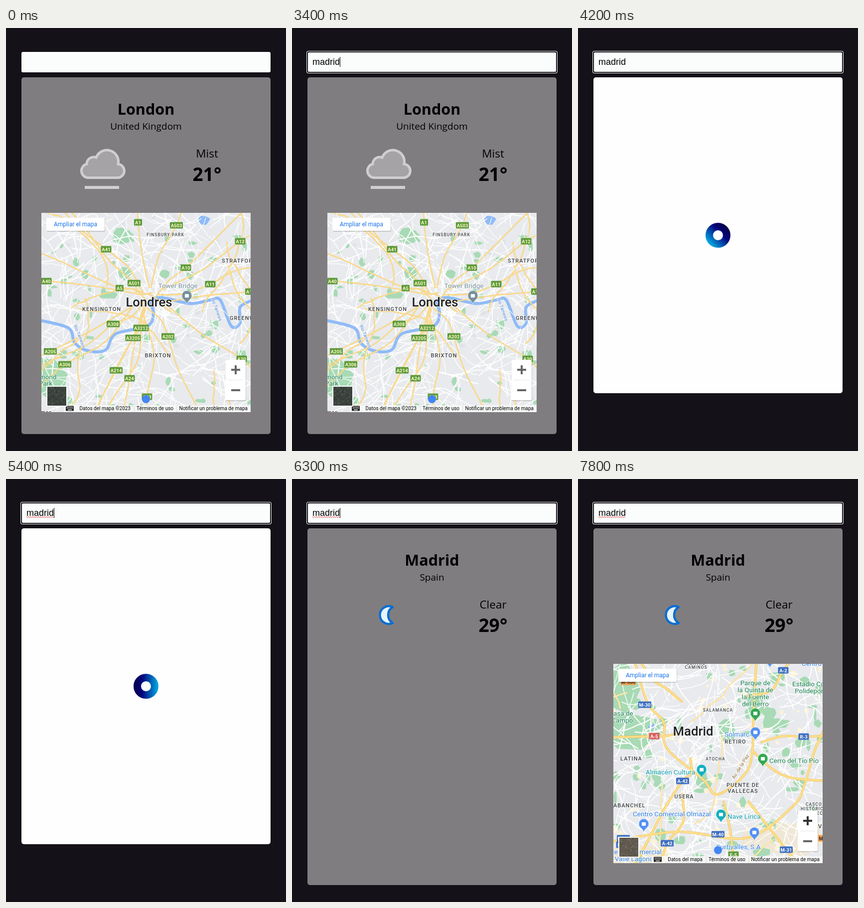
An HTML page for the animation above (8000 ms loop, 562 by 849 pixels).

```html
<!DOCTYPE html>
<html lang="es">
<head>
<meta charset="utf-8">
<style>
  html, body { margin: 0; width: 100%; height: 100%; overflow: hidden; background: #151118; }
  svg { display: block; }
  .card text { font-family: "Open Sans", "Noto Sans", sans-serif; text-anchor: middle; }
  .card .map text { font-family: Roboto, Arial, sans-serif; }
  .map .label { paint-order: stroke; stroke: #fff; stroke-width: 2px; stroke-opacity: .75; stroke-linejoin: round; }
  .line { fill: none; stroke-linecap: round; stroke-linejoin: round; }
  #query { font: 18px "Liberation Sans", Arial, sans-serif; }
  .crisp { shape-rendering: crispEdges; }
</style>
</head>
<body>
<svg id="stage" width="562" height="849" viewBox="0 0 562 849"></svg>
<script>
const LOOP = 8000;
const INK = '#3c4043', GREEN = '#188050', BLUE = '#2f7de1', TEAL = '#129eaf';
const PARK = '#a8dab5', WATER = '#90bbf7', SAND = '#efe7d6';
const SIGN = { blue: '#3f70c2', green: '#5d9a3a', red: '#d9605f', orange: '#f29b4b' };

let seed = 1;
const random = () => (seed = (seed * 16807) % 2147483647) / 2147483647;
const between = (a, b) => a + (b - a) * random();
const clamp = (v, lo, hi) => Math.max(lo, Math.min(hi, v));
const repeat = (n, make) => Array.from({ length: n }, (_, i) => make(i)).join('');

const rect = (x, y, w, h, fill, extra = '') =>
  `<rect x="${x}" y="${y}" width="${w}" height="${h}" fill="${fill}" ${extra}/>`;
const text = (x, y, size, str, extra = '') =>
  `<text x="${x}" y="${y}" font-size="${size}" ${extra}>${str}</text>`;
const label = (x, y, size, str, fill = INK, anchor = 'middle', extra = '') =>
  text(x, y, size, str, `class="label" fill="${fill}" style="text-anchor:${anchor}" ${extra}`);
const place = (x, y, str, fill, anchor) => label(x, y, 13.5, str, fill, anchor);
const district = (x, y, size, str, anchor) =>
  label(x, y, size, str, INK, anchor, 'font-weight="500" letter-spacing="1"');
const cityName = (x, y, str) => label(x, y, 25.7, str, '#202124', 'middle', 'font-weight="500"');
const tilted = (x, y, size, angle, str, fill) =>
  label(x, y, size, str, fill, 'middle', `transform="rotate(${angle} ${x} ${y})"`);
const line = (d, color, width) =>
  `<path class="line" d="${d}" stroke="${color}" stroke-width="${width}"/>`;

// Smooth curve through [x, y] points.
function curve(p) {
  const at = i => p[clamp(i, 0, p.length - 1)];
  let d = `M${p[0]}`;
  for (let i = 0; i < p.length - 1; i++) {
    const [a, b, c, e] = [at(i - 1), at(i), at(i + 1), at(i + 2)];
    const c1 = b.map((v, k) => v + (c[k] - a[k]) / 6);
    const c2 = c.map((v, k) => v - (e[k] - b[k]) / 6);
    d += `C${c1} ${c2} ${c}`;
  }
  return d;
}
const through = points => curve(points.split(' ').map(s => s.split(',').map(Number)));

const roads = (paths, edge, fill, width) =>
  paths.map(d => line(d, edge, width)).join('') + paths.map(d => line(d, fill, width - 1.6)).join('');

// A wobbling road from near the centre, through a sign, out past the map edge.
const radial = (cx, cy, from) => ({ x, y }) => {
  const dx = x - cx, dy = y - cy, size = Math.hypot(dx, dy);
  const point = k => {
    const wobble = k === 1 ? 0 : between(-14, 14);
    return [cx + dx * k - dy / size * wobble, cy + dy * k + dx / size * wobble];
  };
  return curve([from, (1 + from) / 2, 1, 1 + 70 / size, 1 + 180 / size, 1 + 320 / size].map(point));
};

function blob(x, y, rx, ry, fill) {
  const points = Array.from({ length: 9 }, (_, i) => {
    const a = i * Math.PI / 4.5 + between(-.25, .25), r = between(.75, 1.15);
    return `${(x + rx * r * Math.cos(a)).toFixed(1)},${(y + ry * r * Math.sin(a)).toFixed(1)}`;
  });
  return `<polygon points="${points.join(' ')}" fill="${fill}"/>`;
}
const scatter = (n, size, fill) => repeat(n, () =>
  blob(between(71, 491), between(371, 771), between(3, size), between(3, size), fill));

function wander(steps, stride) {
  let x = between(60, 500), y = between(360, 780), a = between(0, 6.3), d = `M${x.toFixed(1)} ${y.toFixed(1)}`;
  for (let i = 0; i < steps; i++) {
    a += between(-.35, .35);
    d += `l${(stride * Math.cos(a)).toFixed(1)} ${(stride * Math.sin(a)).toFixed(1)}`;
  }
  return d;
}
const streets = (n, width) => repeat(n, () => line(wander(7, 12), '#fff', between(width * .5, width).toFixed(1)));
const wanderers = (n, steps) => Array.from({ length: n }, () => wander(steps, 14));

// Signs are written as "name,x,y name,x,y ...".
const signs = list => list.split(' ').map(s => {
  const [name, x, y] = s.split(',');
  return { name, x: +x, y: +y };
});
const badge = (fill, ink = '#fff') => ({ name, x, y }) => {
  const w = name.length * 5 + 6;
  return rect(x - w / 2, y - 6.5, w, 13, fill, 'rx="1.5"') +
    text(x, y + 3.5, 9.5, name, `fill="${ink}" font-weight="700"`);
};
const badges = (list, fill, ink) => list.map(badge(fill, ink)).join('');

const pin = (x, y, fill) =>
  `<path d="M${x} ${y + 17}c-2-8-10-9-10-17a10 10 0 0 1 20 0c0 8-8 9-10 17z" fill="${fill}" stroke="#fff" stroke-width=".6"/>` +
  rect(x - 4, y - 3, 8, 7, '#fff', 'rx="1"');

const map = (id, content) =>
  `<svg id="${id}" class="map" x="71" y="371" width="420" height="400" viewBox="71 371 420 400">` +
  rect(71, 371, 420, 400, '#e8eaed') + content + '</svg>';

function controls(id, [ground, light, dark], keyboardX, credit) {
  const keys = repeat(12, i => rect(keyboardX + 2 + i % 6 * 2.2, 760 + Math.floor(i / 6) * 2.6, 1.2, 1.4, '#fff'));
  const speckle = repeat(60, i => rect(between(83, 117).toFixed(1), between(720, 755).toFixed(1), 3, 2,
    i % 2 ? light : dark, 'opacity=".6"'));
  return `<g id="${id}">` +
    rect(82, 382, 117, 27, '#000', 'rx="2" opacity=".15"') + rect(81, 381, 117, 26, '#fff', 'rx="2"') +
    text(139.5, 398, 12, 'Ampliar el mapa', 'fill="#1a73e8"') +
    rect(441, 667, 41, 82, '#000', 'rx="2" opacity=".15"') + rect(441, 666, 40, 81, '#fff', 'rx="2"') +
    rect(446, 706, 30, 1, '#e6e6e6') +
    `<path id="${id}Plus" class="crisp" d="M452 686h18M461 677v18" stroke="#666" stroke-width="4"/>` +
    '<path class="crisp" d="M452 727h18" stroke="#666" stroke-width="4"/>' +
    '<circle cx="281" cy="745" r="8" fill="#4285f4"/>' +
    rect(keyboardX - 4, 757, 495 - keyboardX, 14, '#f8f8f8', 'opacity=".85"') +
    rect(keyboardX, 758.5, 16, 10, '#222', 'rx="1"') + keys + rect(keyboardX + 4, 765.8, 8, 1.4, '#fff') +
    rect(257, 757, .6, 14, '#ccc') + rect(342, 757, .6, 14, '#ccc') +
    text(250, 767, 10, credit, 'style="text-anchor:end"') +
    text(299, 767, 10, 'Términos de uso') +
    text(485, 767, 10, 'Notificar un problema de mapa', 'style="text-anchor:end"') +
    rect(81, 718, 42, 42, '#fff', 'rx="3"') + rect(83, 720, 38, 38, ground) + speckle + '</g>';
}

function londonMap() {
  seed = 4711;
  const thames = through('65,586 125,602 138,632 165,648 200,646 220,614 284,598 296,572 291,549 312,541 370,553 410,546 430,546 452,598 470,592 470,560 498,545');
  const routes = signs('A1,265,390 A503,342,396 A41,201,444 A12,470,428 A10,361,481 A40,81,508 A501,257,512 A5,228,522 A11,410,514 A308,215,594 A3212,271,602 A202,325,619 A3205,255,622 A205,89,649 A306,118,675 A214,221,687 A24,248,703 A20,473,664 A23,283,740 A1,488,529');
  return map('londonMap',
    blob(88, 705, 36, 44, PARK) + blob(233, 418, 22, 18, PARK) + blob(240, 494, 15, 14, PARK) +
    blob(206, 536, 19, 8, PARK) + scatter(70, 11, PARK) + scatter(25, 8, '#dfe3e8') +
    blob(397, 386, 13, 11, WATER) + streets(290, 2.2) + line(thames, WATER, 6) +
    roads([...routes.map(radial(290, 545, .15)), ...wanderers(10, 16)], '#f8d37a', '#fee09a', 2.6) +
    streets(30, 1.2) + badges(routes, SIGN.green, '#fff9c9') +
    district(320, 418, 8.5, 'FINSBURY PARK') + district(192, 568, 11, 'KENSINGTON') +
    district(433, 471, 11, 'STRATFORD', 'start') + district(449, 586, 11, 'GREENWICH', 'start') +
    district(305, 661, 11, 'BRIXTON') + district(70, 775, 10, 'mes', 'start') +
    tilted(145, 620, 9, 68, 'Río Támesis', '#4a7fd0') + tilted(420, 566, 9, 70, 'Río Támesis', '#4a7fd0') +
    place(67, 705, 'mond', GREEN, 'start') + place(66, 718, 'Park', GREEN, 'start') +
    place(345, 522, 'Tower Bridge', '#78909c') + pin(363, 537, '#78909c') +
    cityName(287, 559, 'Londres') +
    controls('londonControls', ['#3c433f', '#5c625c', '#2c322f'], 120, 'Datos del mapa ©2023'));
}

function madridMap() {
  seed = 9001;
  const ring = through('113,365 140,450 172,488 178,540 250,602 280,633 335,592 350,545 352,470 358,365');
  const outerRing = through('65,728 200,708 340,720 432,656 455,612 475,545 498,495');
  const eastLink = through('350,545 390,582 430,600 498,606');
  const routes = signs('A-2,412,384 R-3,453,517 A-42,210,606 A-42,179,731 M-31,418,744');
  const redRoutes = signs('A-6,147,400 A-5,153,516'), euroRoutes = signs('E-5,312,754');
  const highways = [ring, outerRing, eastLink,
    ...[...routes, ...redRoutes, ...euroRoutes].map(radial(265, 520, .55))];
  return map('madridMap',
    blob(110, 758, 70, 24, SAND) + blob(420, 722, 95, 38, SAND) +
    scatter(75, 15, PARK) + scatter(60, 8, '#fdf3d8') +
    blob(85, 418, 42, 56, PARK) + blob(108, 505, 58, 42, PARK) + blob(300, 505, 20, 26, PARK) +
    blob(357, 445, 18, 30, PARK) + blob(395, 490, 32, 12, PARK) + blob(149, 497, 8, 6, WATER) +
    streets(270, 2.4) + roads(wanderers(8, 14), '#f8d98d', '#fff0c4', 3) +
    roads(highways, '#f6bd42', '#fde293', 4.6) +
    badges(routes, SIGN.blue) + badges(redRoutes, SIGN.red) + badges(euroRoutes, SIGN.green) +
    badges(signs('M-30,134,453 M-40,91,721 R-5,87,734 M-40,281,713'), SIGN.blue) +
    badges(signs('M-500,101,407 M-50,495,721'), SIGN.orange, '#333') +
    pin(385, 362, '#5491f5') + pin(356, 470, '#34a853') + pin(371, 561, '#34a853') + pin(356, 508, '#5491f5') +
    pin(132, 692, '#5491f5') + pin(354, 709, '#5491f5') + pin(248, 583, '#12b0c0') + pin(287, 673, '#12b0c0') +
    district(237, 373, 8.5, 'CUATRO') + district(237, 381, 8.5, 'CAMINOS') + district(281, 467, 8.5, 'SALAMANCA') +
    district(316, 531, 11, 'RETIRO') + district(276, 565, 8.5, 'ATOCHA') + district(107, 565, 11, 'LATINA') +
    district(213, 641, 11, 'USERA') + district(331, 618, 11, 'PUENTE DE') + district(331, 630, 11, 'VALLECAS') +
    district(71, 659, 11, 'ABANCHEL', 'start') + district(211, 777, 11, 'VILLAVERDE') +
    district(457, 656, 8.5, 'CASCO', 'start') + district(447, 665, 8.5, 'HISTÓRICO', 'start') +
    district(440, 674, 8.5, 'DE VALLECAS', 'start') + district(482, 701, 11, 'VI', 'start') +
    ['Parque de', 'la Quinta de', 'la Fuente', 'del Berro'].map((s, i) => place(356, 414 + i * 14, s, GREEN)).join('') +
    place(384, 570, 'Cerro del Tío Pío', GREEN, 'start') +
    place(71, 475, 'asa de', GREEN, 'start') + place(67, 489, 'Campo', GREEN, 'start') +
    place(430, 416, 'Estadio Co', GREEN, 'start') + place(435, 430, 'Polidepor', GREEN, 'start') +
    place(449, 375, 'Centro', BLUE, 'start') + place(344, 517, 'Solmarc', BLUE, 'end') +
    place(110, 677, 'Centro Comercial Olmazal', BLUE, 'start') + place(322, 743, 'Surtivalles, S.A', BLUE) +
    place(168, 753, 'Centro Comercial', BLUE, 'end') + place(168, 767, 'Valle Lagonorte', BLUE, 'end') +
    place(235, 593, 'Almacén Cultura', TEAL, 'end') + place(300, 682, 'Nave Lírica', TEAL, 'start') +
    tilted(329, 579, 10, -58, 'Av. de la Paz', '#94692d') + cityName(231, 515, 'Madrid') +
    controls('madridControls', ['#62594f', '#847b70', '#40553c'], 152, 'Datos del mapa'));
}

const card = (id, city, country, sky, degrees, icon, cityMap) =>
  `<g id="${id}" class="card">` + rect(31, 99, 500, 716, '#807d80', 'rx="5"') +
  text(281, 174, 30.6, city, 'font-weight="700"') + text(281, 204, 19, country) +
  text(403.5, 260, 22.5, sky) + text(403.5, 307, 37, degrees, 'font-weight="700"') +
  icon + cityMap + '</g>';

const cloud = '<path d="M164 300.5A14 14 0 0 1 162 273A14 14 0 0 1 181 260A23 23 0 0 1 225 273A13.7 13.7 0 0 1 222 300.5Z" fill="#a5a3a5" stroke="#d0cfd0" stroke-width="5"/>' +
  rect(158, 317, 69, 6, '#d0cfd0');
const moon = '<path d="M202 257A17.8 17.8 0 1 0 202 289A18.7 18.7 0 0 1 202 257Z" fill="#e6f5fd" stroke="#0c6dd0" stroke-width="4.5" stroke-linejoin="round"/>';

const stage = document.getElementById('stage');
stage.innerHTML =
  `<defs><linearGradient id="ring" gradientUnits="userSpaceOnUse" x1="256" y1="416" x2="306" y2="416">
    <stop offset="0" stop-color="#0a0048"/><stop offset=".35" stop-color="#04047c"/><stop offset="1" stop-color="#00aee6"/>
  </linearGradient></defs>` +
  rect(0, 0, 562, 849, '#151118') + rect(31, 48, 500, 41, '#fafdfc', 'rx="3"') +
  '<g id="focus">' + rect(29, 46, 504, 45, '#fff', 'rx="4"') + rect(30, 47, 502, 43, '#101014', 'rx="3"') +
  rect(32, 49, 498, 39, '#fafdfc', 'rx="2"') + '</g>' +
  '<text id="query" x="41" y="74"></text>' +
  `<g id="squiggle">${line('M41 75.5' + 'l2 2l2 -2'.repeat(13) + 'l2 2', '#e5322d', 1)}</g>` +
  rect(41, 58, 1, 20, '#000', 'id="caret" class="crisp"') +
  card('london', 'London', 'United Kingdom', 'Mist', '21°', cloud, londonMap()) +
  '<g id="loading">' + rect(31, 99, 500, 634, '#fefefe', 'rx="5"') +
  '<circle id="spinner" cx="281" cy="416" r="17.5" fill="none" stroke="url(#ring)" stroke-width="15"/></g>' +
  card('madrid', 'Madrid', 'Spain', 'Clear', '29°', moon, madridMap());

const get = id => document.getElementById(id);
const show = (id, on) => { get(id).style.display = on ? '' : 'none'; };
const blink = (t, start) => Math.floor((t - start) / 500) % 2 === 0;
// Three letters, one every 100 ms.
const burst = (t, start) => clamp(Math.floor((t - start) / 100) + 1, 0, 3);

function draw() {
  const t = performance.now() % LOOP;
  const query = get('query');
  query.textContent = 'madrid'.slice(0, burst(t, 2700) + burst(t, 3200));
  const width = query.textContent ? query.getComputedTextLength() : 0;
  get('caret').setAttribute('x', 41 + Math.round(width));
  show('caret', t >= 800 && (t < 2700 ? blink(t, 800) : t < 3300 || blink(t, 3300)));
  show('focus', t >= 800);
  show('squiggle', t >= 4300);

  show('london', t < 3600);
  show('loading', t >= 3600 && t < 6300);
  show('madrid', t >= 6300);
  show('madridMap', t >= 6600);
  get('spinner').setAttribute('transform', `rotate(${(t - 5400) * .7875} 281 416)`);

  get('madridControls').style.opacity = clamp(Math.floor((t - 7000) / 100) / 5, 0, 1);
  get('madridControlsPlus').setAttribute('stroke', t >= 7700 ? '#333' : '#666');
  requestAnimationFrame(draw);
}
draw();
</script>
</body>
</html>
```
